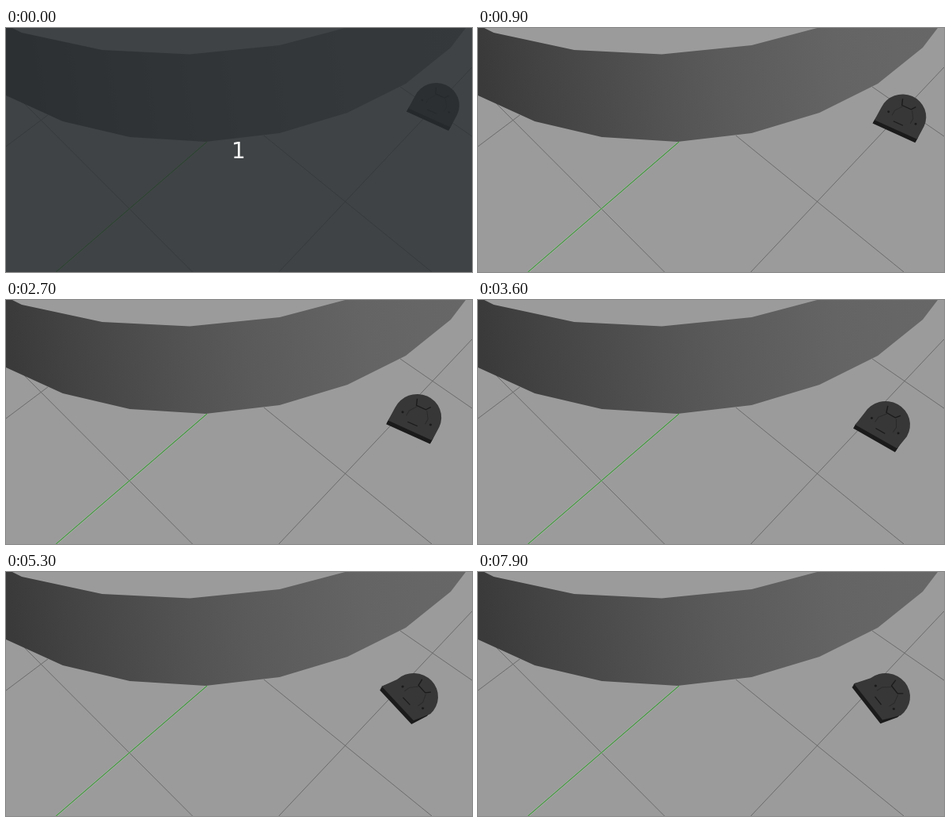
An HTML page with a canvas for the animation above (8000 ms loop, 591x311 px).

```html
<!DOCTYPE html>
<html lang="en">
<head>
<meta charset="utf-8">
<title>Robot by the ring wall</title>
<style>
  html, body { margin: 0; width: 100%; height: 100%; overflow: hidden; background: #9b9b9b; }
  canvas { display: block; width: 591px; height: 311px; }
</style>
</head>
<body>
<canvas id="stage" width="591" height="311"></canvas>
<script>
const ctx = document.getElementById('stage').getContext('2d');
const W = 591, H = 311, LOOP = 8000, STEP = 100;
const RAD = Math.PI / 180;
const TILT = 0.9; // vertical foreshortening of the floor
const DARK = '#1b1b1b';

// wall outline: upper rim left to right, then lower rim back
const WALL = [-2, -5, 20, 6, 122, 28, 233, 33.5, 347, 22, 430, 0, 583, 0,
  564, 25, 507, 71, 433, 108, 347, 134, 253, 145, 157, 139, 72, 119, -2, 85];

const ramp = (t, a, b) => Math.min(1, Math.max(0, (t - a) / (b - a)));
const mix = (a, b, k) => a + (b - a) * k;
const smooth = k => k * k * (3 - 2 * k);

function trace(...p) {
  ctx.beginPath();
  for (let i = 0; i < p.length; i += 2) ctx.lineTo(p[i], p[i + 1]);
}

function line(color, width, ...p) {
  trace(...p);
  ctx.strokeStyle = color;
  ctx.lineWidth = width;
  ctx.stroke();
}

function drawFloor() {
  const grid = (...p) => line('#666', 0.9, ...p);
  ctx.fillStyle = '#9b9b9b';
  ctx.fillRect(0, 0, W, H);
  grid(22, 95, 236.5, 311);
  grid(0, 151, 53, 111);
  grid(327, 137, 540, 311);
  grid(346, 311, 591, 50);
  grid(500, 75, 591, 138);
  line('#b0c6ae', 2.2, 63.5, 311, 255, 145);
  line('#438b40', 1.1, 63.5, 311, 255, 145);
}

function drawWall() {
  const shade = ctx.createLinearGradient(0, 20, W, -60);
  for (let k = 0; k <= 1; k += 0.125) {
    const v = 58 + 45 * Math.sin(k * Math.PI / 2);
    shade.addColorStop(k, `rgb(${v}, ${v}, ${v})`);
  }
  trace(...WALL);
  ctx.fillStyle = shade;
  ctx.fill();
}

// drives down along the grid, then turns, overshoots and settles
function poseAt(t) {
  const k = ramp(t, 100, 3150) ** 1.05;
  const turn = mix(26.8, 59, ramp(t, 3050, 6150));
  return {
    x: mix(545.5, 517, k),
    y: mix(98.5, 159, k),
    size: mix(0.95, 1, k),
    angle: (turn - 4.1 * smooth(ramp(t, 6200, 7000))) * RAD
  };
}

function drawRobot(t) {
  const { x, y, size, angle } = poseAt(t);
  const ux = Math.cos(angle), uy = Math.sin(angle) * TILT;
  const nx = Math.sin(angle), ny = -Math.cos(angle) * TILT;
  const phi = Math.atan2(uy, ux);

  ctx.save();
  ctx.translate(x, y);
  ctx.scale(size, size);

  // flat front edge joined to a half-round back
  function slab(rx, ry, color) {
    const mx = 7.3 - 36 * nx, my = -12.2 - 36 * ny, half = 31.5;
    trace(mx + half * ux, my + half * uy);
    ctx.ellipse(0, 0, rx, ry, 0, phi, phi - Math.PI, true);
    ctx.lineTo(mx - half * ux, my - half * uy);
    ctx.closePath();
    ctx.fillStyle = color;
    ctx.fill();
  }
  for (let k = 1; k > 0; k -= 0.2) {
    ctx.save();
    ctx.translate(-2.6 * k, 4.6 * k);
    slab(28.5, 27.5, DARK);
    ctx.restore();
  }
  slab(31, 30, '#373737');

  // x runs along the front edge, y towards the back
  ctx.transform(ux, uy, nx, ny, 0, 0);
  for (const side of [-1, 1]) {
    line('#2a2a2a', 1, side * 7, 14, side * 13.5, 4, side * 13.5, -4);
    ctx.beginPath();
    ctx.arc(side * 20, -1.5, 1.6, 0, 7);
    ctx.fillStyle = DARK;
    ctx.fill();
  }
  line(DARK, 1.4, -12, 24, -8.5, 15, 5, 15, 9, 21);
  line(DARK, 1.3, -8, -11, 6, -11);
  ctx.restore();
}

function drawHand(t) {
  if (t < 4400 || t >= 4800) return;
  const away = 1 - ramp(t, 4400, 4600);
  const hand = new Path2D('M4 1.5Q6-.2 7.2 2L8.4 6Q10 4.8 11 6.2Q12.6 5.2 13.5 6.6' +
    'Q15.7 6 16 8.5L15.4 12.5L13.8 14.5V16.6H6.5V15L2 10.8Q0 8.6 2 8Q3.4 7.8 5.4 9.8Z');
  ctx.save();
  ctx.translate(306 + 4 * away, 148 + 126 * away ** 2);
  ctx.lineWidth = 1.5;
  ctx.strokeStyle = '#333';
  ctx.fillStyle = '#fff';
  ctx.stroke(hand);
  ctx.fill(hand);
  ctx.restore();
}

function drawCountdown() {
  ctx.fillStyle = 'rgba(41, 45, 48, 0.8)';
  ctx.fillRect(0, 0, W, H);
  ctx.fillStyle = '#f4f4f4';
  ctx.font = '28px "DejaVu Sans", sans-serif';
  ctx.textAlign = 'center';
  ctx.fillText('1', 295, 166);
}

function draw(t) {
  drawFloor();
  drawWall();
  drawRobot(t);
  drawHand(t);
  if (t < STEP) drawCountdown();
}

const start = performance.now();
function tick() {
  const t = (performance.now() - start) % LOOP;
  draw(Math.floor(t / STEP) * STEP);
  requestAnimationFrame(tick);
}
tick();
</script>
</body>
</html>
```
